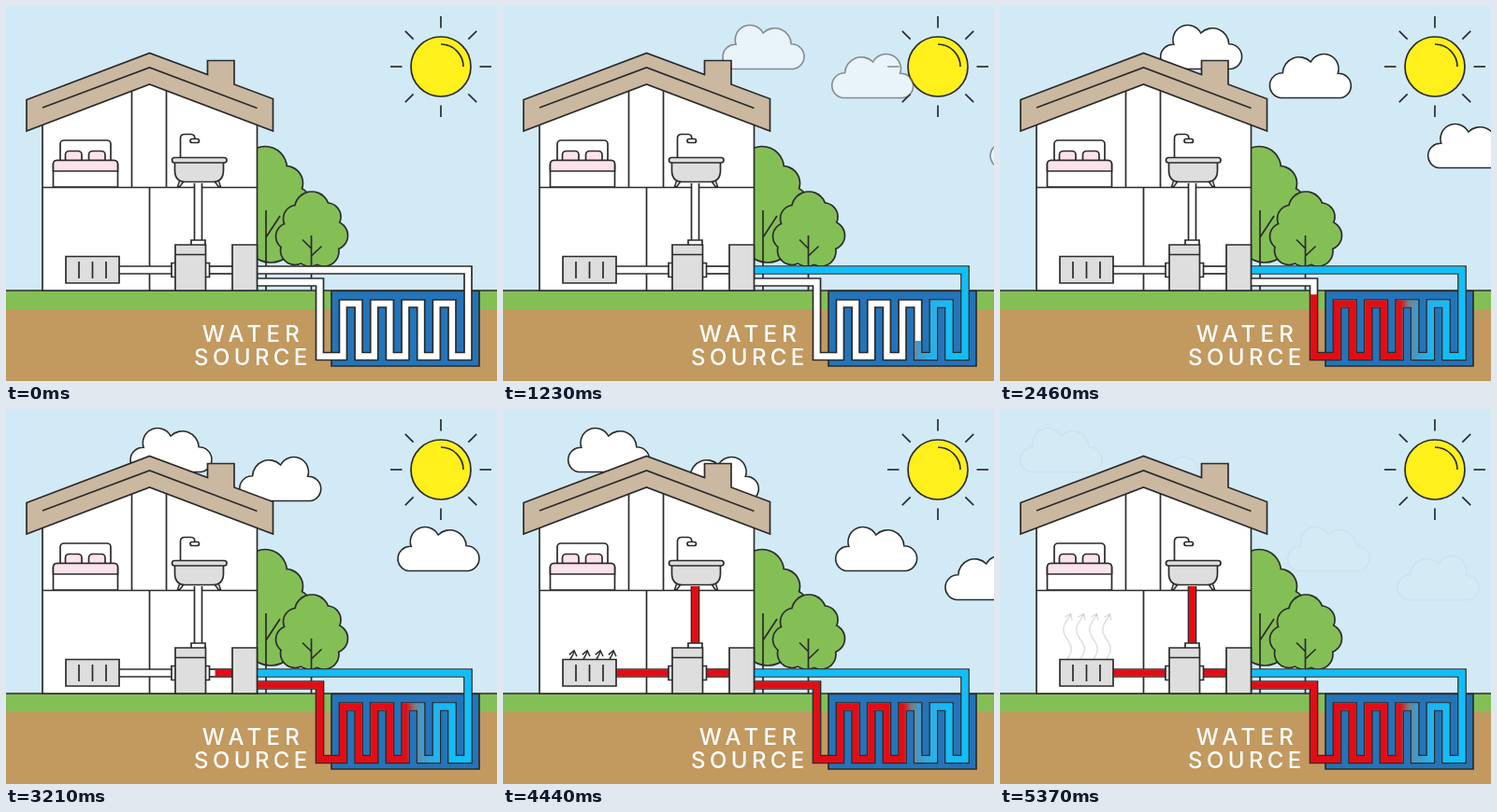
These frames come from a looping animation (525 px wide and 402 px high, 5400 ms). An HTML page with a canvas:

```html
<!DOCTYPE html>
<html lang="en">
<head>
<meta charset="utf-8">
<title>Water source heat pump</title>
<style>
  html, body { margin: 0; width: 100%; height: 100%; overflow: hidden; background: #d2eaf6; }
  canvas, svg { position: absolute; left: 0; top: 0; width: 525px; height: 402px; display: block; }
  text { font: 500 24px Inter, "Open Sans", sans-serif; letter-spacing: 4.4px; fill: #fff; text-anchor: middle; }
  .wide { letter-spacing: 5.2px; }
</style>
</head>
<body>
<canvas id="stage"></canvas>
<svg viewBox="0 0 525 402">
  <text class="wide" x="264.3" y="360">WATER</text>
  <text x="263.9" y="385">SOURCE</text>
</svg>
<script>
const LOOP = 5400, W = 525, H = 402;
const INK = '#2b2b2b', GREY = '#dedede', WHITE = '#fff', PINK = '#fbe3ee';
const ROOF = '#cbb8a0', LEAF = '#84bf56', RED = '#e40c14', COLD = '#10bffa';

const canvas = document.getElementById('stage');
const ctx = canvas.getContext('2d');
const ratio = window.devicePixelRatio || 1;
canvas.width = W * ratio;
canvas.height = H * ratio;

const clamp = v => Math.max(0, Math.min(1, v));
const span = (t, a, b) => clamp((t - a) / (b - a));

function shape(d, fill, width = 1.7) {
  const p = new Path2D(d);
  if (fill) { ctx.fillStyle = fill; ctx.fill(p); }
  ctx.strokeStyle = INK;
  ctx.lineWidth = width;
  ctx.stroke(p);
}

function box(x, y, x2, y2, fill, r = 0) {
  const p = new Path2D();
  p.roundRect(x, y, x2 - x, y2 - y, r);
  shape(p, fill);
}

function disc(x, y, r, fill) {
  ctx.beginPath();
  ctx.arc(x, y, r, 0, Math.PI * 2);
  ctx.fillStyle = fill;
  ctx.fill();
}

// Coil centre line, walked from the right riser to the heat exchanger
function coilPoints() {
  const top = 319, bottom = 375.5;
  const columns = [494];
  for (let i = 0; i < 8; i++) columns.push(477 - 16.65 * i);
  columns.push(335.5);
  const pts = [[494, 320]];
  columns.forEach((x, i) => {
    if (i) pts.push([x, i % 2 ? bottom : top]);
    if (i < columns.length - 1) pts.push([x, i % 2 ? top : bottom]);
  });
  pts.push([335.5, 296], [262, 296]);
  return pts;
}

const supply = [[262, 283], [494, 283], [494, 320]];
const coil = coilPoints();
const loopPipe = supply.concat(coil.slice(1));
const feed = [[242, 283], [217, 283]];
const heating = [[177, 283], [121, 283]];
const riser = [[205.5, 251], [205.5, 190]];

function length(pts) {
  return pts.slice(1).reduce((n, p, i) => n + Math.hypot(p[0] - pts[i][0], p[1] - pts[i][1]), 0);
}

function line(pts, color, width) {
  ctx.beginPath();
  pts.forEach(p => ctx.lineTo(p[0], p[1]));
  ctx.strokeStyle = color;
  ctx.lineWidth = width;
  ctx.stroke();
}

function pipe(pts) {
  line(pts, INK, 9.7);
  line(pts, WHITE, 6.3);
}

function flow(pts, dist, color) {
  if (dist <= 0) return;
  ctx.setLineDash([dist, 9999]);
  line(pts, color, 7);
  ctx.setLineDash([]);
}

const heat = ctx.createLinearGradient(428, 0, 482, 0);
heat.addColorStop(0, RED);
heat.addColorStop(0.07, '#b53a40');
heat.addColorStop(0.16, '#7c7c80');
heat.addColorStop(0.32, '#3f9cce');
heat.addColorStop(0.6, '#22b3ee');
heat.addColorStop(1, COLD);

const cloudShape = 'M12.5 48.5H76.5A13.4 13.4 0 0 0 74.5 21.8A17.5 17.5 0 0 0 44.5 10' +
  'A15.8 15.8 0 0 0 15.5 22.3A13.2 13.2 0 0 0 12.5 48.5Z';

function clouds(t) {
  ctx.save();
  ctx.globalAlpha = span(t, 830, 1630) * (1 - span(t, 4590, 5400));
  const x = 297 - 0.0515 * t;
  [[0, 19], [117.5, 50], [286, 125], [404, 156]].forEach(([dx, y], i) => {
    const mirrored = i % 2;
    ctx.save();
    ctx.translate(x + dx + (mirrored ? 89 : 0), y);
    ctx.scale(mirrored ? -1 : 1, 1);
    shape(cloudShape, WHITE, 1.6);
    ctx.restore();
  });
  ctx.restore();
}

function sun() {
  disc(465, 65, 32, '#fff01c');
  shape('M433 65a32 32 0 1 0 64 0a32 32 0 1 0 -64 0M465 41A24 24 0 0 1 489 65');
  for (let i = 0; i < 8; i++) {
    const a = i * Math.PI / 4, c = Math.cos(a), s = Math.sin(a);
    line([[465 + 41.5 * c, 65 + 41.5 * s], [465 + 54 * c, 65 + 54 * s]], INK, 1.7);
  }
}

function tree(bumps, branches) {
  bumps.forEach(([x, y, r]) => disc(x, y, r + 0.85, INK));
  bumps.forEach(([x, y, r]) => disc(x, y, r - 0.85, LEAF));
  shape(branches);
}

function ground() {
  ctx.fillStyle = LEAF;
  ctx.fillRect(0, 305, W, 20);
  ctx.fillStyle = '#c2995f';
  ctx.fillRect(0, 325, W, 77);
  line([[0, 305], [W, 305]], INK, 1.7);
}

function house() {
  shape('M39 120L153 78L268.5 120V305H39Z', WHITE);
  shape('M134.5 88V194M171.5 88V194M39 194.5H268M153.5 194V305');
  shape('M22 100.5L153.5 50.5L215.5 73.5V58.5H244V84L285.5 99.5V134L153.5 84L22 134Z', ROOF);
  shape('M39 109L153.5 66L268.5 109.5');
}

function bedroom() {
  box(58, 144, 112, 168, WHITE, 4);
  box(63.5, 155.5, 81, 170, PINK, 4);
  box(88.5, 155.5, 106, 170, PINK, 4);
  box(50.5, 165.5, 119.5, 194, WHITE, [4, 4, 0, 0]);
  box(50.5, 165.5, 119.5, 177, PINK, [4, 4, 0, 0]);
}

function bathroom() {
  shape('M186.5 163V142Q186.5 137.5 191 137.5H198Q202 137.5 202 143');
  box(197, 142.5, 206.5, 146.5, WHITE, 2);
  shape('M186 186L183.5 193.5H186L190 188M227 186L229.5 193.5H227L223 188', GREY, 1.4);
  shape('M180.5 167V176Q180.5 188.5 192 188.5H221Q232.5 188.5 232.5 176V167Z', GREY);
  box(177.5, 162.5, 236, 168, GREY, 2.7);
}

function machines() {
  box(64, 268.5, 121, 297, GREY);
  shape('M78 274V292M92.5 274V292M107 274V292');
  box(198, 251, 213, 257, WHITE);
  box(177, 275.5, 182, 290.5, WHITE);
  box(213, 275.5, 217.5, 290.5, WHITE);
  box(181, 256, 213.5, 305, GREY);
  shape('M181 266.5H213.5');
  box(242, 256, 268.5, 305, GREY);
}

// Warm air: wavy strokes growing upwards with a head on the tip
function warmAir(t) {
  const p = span(t, 4250, 5400);
  if (!p) return;
  const h = 49 * (1 - Math.pow(1 - p, 1.12));
  const wave = u => 4.2 * Math.sin(u * Math.PI / 21);
  ctx.save();
  ctx.globalAlpha = 1 - span(t, 4950, 5450);
  ctx.strokeStyle = INK;
  ctx.lineWidth = 1.5;
  for (let i = 0; i < 4; i++) {
    ctx.save();
    ctx.translate(72 + 14 * i, 268);
    ctx.beginPath();
    for (let u = 0; u < h; u++) ctx.lineTo(wave(u), -u);
    ctx.lineTo(wave(h), -h);
    ctx.stroke();
    ctx.translate(wave(h), -h);
    ctx.rotate(Math.atan2(wave(h) - wave(h - 2), 2));
    ctx.beginPath();
    ctx.moveTo(-4.2, 5.5);
    ctx.lineTo(0, 0);
    ctx.lineTo(4.2, 5.5);
    ctx.stroke();
    ctx.restore();
  }
  ctx.restore();
}

function water(t) {
  pipe(loopPipe);
  const run = 7 + 0.404 * t;
  const first = length(supply);
  flow(supply, Math.min(run, first), COLD);
  flow(coil, run - first, heat);

  [feed, heating, riser].forEach(pipe);
  const front = 269 - 0.0925 * (t - 2720);
  flow(feed, Math.min(25, 242 - front), RED);
  flow(heating, Math.min(56, 177 - front), RED);
  flow(riser, Math.min(61, 179 - front), RED);
}

function draw(t) {
  ctx.setTransform(ratio, 0, 0, ratio, 0, 0);
  ctx.fillStyle = '#d2eaf6';
  ctx.fillRect(0, 0, W, H);
  sun();
  clouds(t);
  ground();
  tree([[277, 174, 23.5], [299, 190, 18.5], [309, 211, 17], [305, 232, 18], [283, 247, 28], [277, 210, 28]],
    'M278 219V305M278 248L293 225');
  tree([[327, 217.5, 18.5], [343, 226, 15], [350, 246, 15.5], [340, 263, 16], [309, 262, 15.5],
    [303, 247, 14.5], [311, 228, 14.5], [327, 245, 25], [325, 262, 17]],
    'M326.5 246V305M326.5 260L317 250.5M326.5 268L337.5 257.5');
  house();
  bedroom();
  box(348, 305.5, 506, 386, '#2474ba');
  water(t);
  bathroom();
  machines();
  warmAir(t);
}

const start = performance.now();
function tick(now) {
  draw(Math.max(0, now - start) % LOOP);
  requestAnimationFrame(tick);
}
draw(0);
requestAnimationFrame(tick);
</script>
</body>
</html>
```
